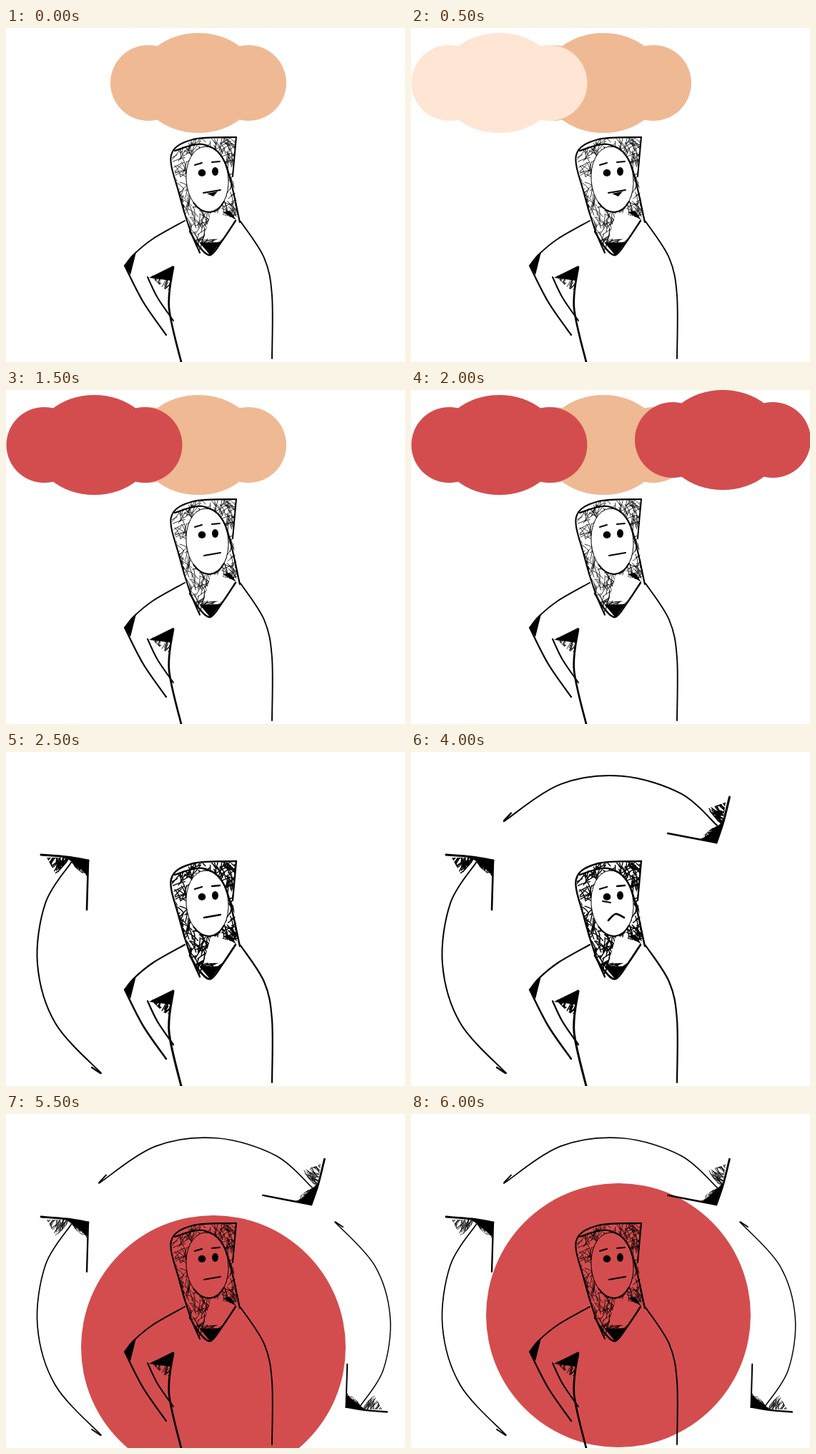
Animation, 558 px wide and 468 px high, one loop 6.5 s. Source, as an HTML page with a canvas:

```html
<!DOCTYPE html>
<html>
<head>
<meta charset="utf-8">
<style>
html, body { margin: 0; width: 100%; height: 100%; overflow: hidden; background: #fff; }
canvas { display: block; }
</style>
</head>
<body>
<canvas id="stage" width="558" height="468"></canvas>
<script>
const ctx = document.getElementById('stage').getContext('2d');
const STEP = 500, STEPS = 13;
const ORANGE = '#efb994', LIGHT = '#ffe5d4', RED = '#d34d4e', BLACK = '#000';
let seed, bold;

function random() {
  seed = (seed * 16807) % 2147483647;
  return seed / 2147483647;
}

function polygon(pts) {
  ctx.beginPath();
  for (let i = 0; i < pts.length; i += 2) ctx.lineTo(pts[i], pts[i + 1]);
  ctx.closePath();
}

function fill(...pts) {
  polygon(pts);
  ctx.fillStyle = BLACK;
  ctx.fill();
}

function stroke(width) {
  ctx.strokeStyle = BLACK;
  ctx.lineWidth = width;
  ctx.lineCap = ctx.lineJoin = 'round';
  ctx.stroke();
}

// Smooth pen line through a few points
function ink(width, ...pts) {
  const last = pts.length / 2 - 1;
  const at = (i, k) => pts[2 * Math.max(0, Math.min(last, i)) + k];
  const handle = (i, k, sign) => at(i, k) + sign * (at(i + 1, k) - at(i - 1, k)) / 6;
  ctx.beginPath();
  ctx.moveTo(pts[0], pts[1]);
  for (let i = 0; i < last; i++) {
    ctx.bezierCurveTo(handle(i, 0, 1), handle(i, 1, 1),
      handle(i + 1, 0, -1), handle(i + 1, 1, -1), at(i + 1, 0), at(i + 1, 1));
  }
  stroke(width + bold * 0.3);
}

// Pencil scribble inside a polygon
function hatch(count, angle, spread, ...pts) {
  const [x0, y0, x1, y1] = [Math.min, Math.max].flatMap(pick =>
    [0, 1].map(k => pick(...pts.filter((_, i) => i % 2 === k))));
  ctx.save();
  polygon(pts);
  ctx.clip();
  ctx.beginPath();
  for (let i = 0; i < count; i++) {
    const x = x0 + (x1 - x0) * random(), y = y0 + (y1 - y0) * random();
    const a = angle + (random() - 0.5) * spread;
    const dx = 9 * Math.cos(a), dy = 9 * Math.sin(a);
    ctx.moveTo(x - dx, y - dy);
    ctx.quadraticCurveTo(x + 2, y - 2, x + dx, y + dy);
  }
  stroke(0.8 + bold * 0.6);
  ctx.restore();
}

function disc(x, y, rx, ry, color) {
  ctx.beginPath();
  ctx.ellipse(x, y, rx, ry, 0, 0, 7);
  ctx.fillStyle = color;
  ctx.fill();
}

function cloud(x, y, color) {
  disc(x - 70, y, 53, 53, color);
  disc(x + 70, y, 53, 53, color);
  disc(x, y, 85, 70, color);
}

// Curved arrow with its corner at (x, y)
function arrow(x, y, degrees = 0, scale = 1) {
  seed = 77;
  ctx.save();
  ctx.translate(x, y);
  ctx.rotate(degrees * Math.PI / 180);
  ctx.scale(scale, scale);
  ink(1.7, -24, 3, -60, 60, -71, 145, -46, 228, 18, 298);
  ink(2.8, -66, -8, -30, -5, 0, 0);
  ink(2.3, 0, 0, -2, 69);
  fill(-32, -5, 0, 0, -1, 19);
  hatch(60, 2.1, 1, -58, -4, -24, -4, -45, 20);
  hatch(40, 0.6, 1, -28, 2, 0, 0, -2, 23);
  ink(2, 5, 290, 17, 298);
  ctx.restore();
}

function faceOval(start = 0, end = 2 * Math.PI) {
  ctx.ellipse(281.5, 212, 29.5, 46, -0.08, start, end);
}

function drawHood() {
  const outline = [271, 315, 257, 282, 242, 232, 231, 178, 262, 156, 322, 153];
  ctx.save();
  ctx.beginPath();
  ctx.rect(0, 0, 558, 468);
  faceOval();
  ctx.clip('evenodd');
  hatch(400, 1.7, 2.4, ...outline, 317, 205, 325, 268, 287, 257);
  hatch(25, 0.8, 1, 300, 154, 323, 153, 319, 182);
  ctx.restore();
  fill(303, 258, 313, 256, 322, 269);

  ink(2.1, ...outline);
  ink(2.2, 236, 172, 275, 163, 306, 188, 327, 272);
  ink(2, 322, 153, 317, 208);
  ctx.beginPath();
  faceOval();
  stroke(1);
  ctx.beginPath();
  faceOval(0.8, 2.4);
  stroke(2);
}

function drawBody() {
  hatch(35, 2.4, 1, 266, 295, 303, 296, 286, 318);
  fill(271, 301, 300, 300, 286, 319);
  ink(2.4, 257, 285, 270, 306, 286, 318, 303, 297, 321, 270);

  ink(1.8, 250, 270, 206, 295, 179, 317, 166, 333);
  fill(166, 333, 182, 314, 174, 346);
  ink(2.2, 166, 333, 192, 384, 224, 430);
  ink(2, 198, 349, 212, 378, 234, 410);

  hatch(55, 2.1, 1, 203, 348, 234, 334, 228, 367, 220, 365);
  fill(200, 350, 234, 333, 231, 354);
  ink(2.7, 234, 335, 228, 392, 246, 472);
  ink(1.9, 328, 271, 361, 322, 372, 375, 372, 463);
}

function drawFace(step) {
  ink(2, 264, 192, 274, 189);
  ink(2, 288, 188, 299, 187);
  disc(274, 203, 5.3, 5, BLACK);
  disc(292.5, 201, 4.5, 6, BLACK);

  const frowning = step >= 7 && step < 11;
  if (frowning) {
    ink(2.4, 276, 236, 286, 227, 298, 232);
    ink(1.6, 268, 209, 279, 211);
  } else if (step > 2) {
    ink(2, 277, 232, 300, 228);
  } else {
    fill(281, 232, 296, 229, 290, 236);
    if (step < 2) ink(1.8, 276, 231, 300, 227);
  }
}

function drawFigure(step) {
  seed = 4242;
  ctx.save();
  ctx.translate(288, 300);
  ctx.rotate(step === 2 ? -0.05 : 0);
  ctx.translate(-288, -300);
  drawHood();
  drawBody();
  drawFace(step);
  ctx.restore();
}

function draw(step) {
  ctx.fillStyle = '#fff';
  ctx.fillRect(0, 0, 558, 468);
  bold = step >= 5 && step < 9 ? 1 : 0;

  if (step < 5) cloud(269, 77, ORANGE);
  if (step > 0 && step < 5) cloud(123.5, 77, step < 3 ? LIGHT : RED);
  if (step === 2 || step === 4) cloud(436, 70, step < 3 ? LIGHT : RED);

  const rise = step - 9;
  if (rise >= 0) disc(290, Math.max(282, 430 - 51.5 * rise), 185, 185, RED);
  if (step >= 5) arrow(115, 152);
  if (step >= 6) arrow(427, 127, 99.2);
  if (rise >= 0) {
    const shift = Math.min(26.5, 16 * rise);
    arrow(449 + shift, 437 - shift, 180, 0.87);
  }
  drawFigure(step);
}

let shown = -1;
function tick() {
  const step = Math.floor(performance.now() / STEP) % STEPS;
  if (step !== shown) draw(shown = step);
  requestAnimationFrame(tick);
}
tick();
</script>
</body>
</html>
```
